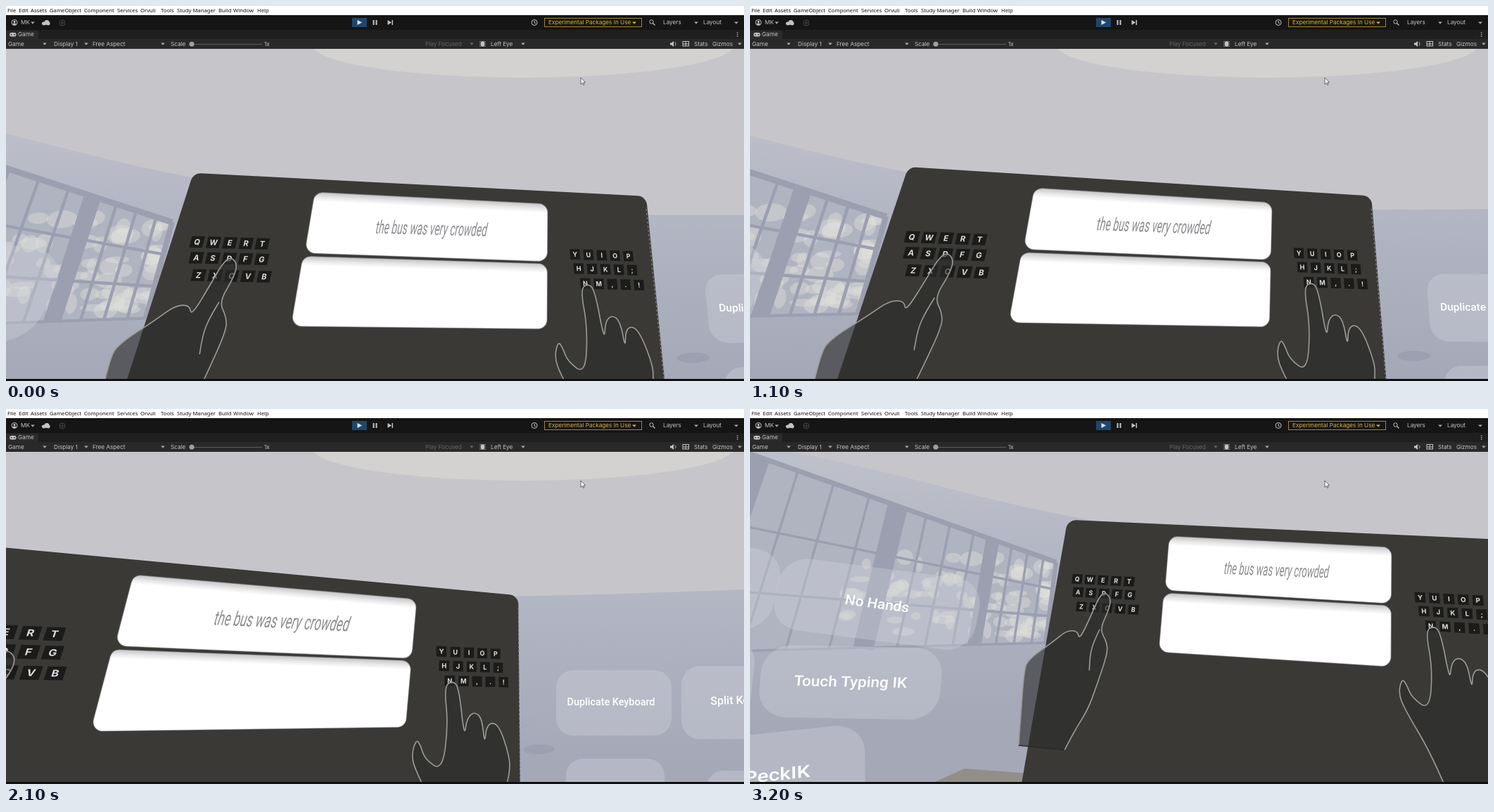
Animation of 1049x534 px, one loop 3300 ms. Source, as an HTML page with a canvas:

```html
<!DOCTYPE html>
<html lang="en">
<head>
<meta charset="utf-8">
<title>Keyboard study</title>
<style>
html, body { margin: 0; width: 100%; height: 100%; overflow: hidden; background: #101010; }
canvas { display: block; }
</style>
</head>
<body>
<canvas id="stage" width="1049" height="534"></canvas>
<script>
const ctx = document.getElementById('stage').getContext('2d');
const LOOP = 3300, STEP = 100;

// Camera path: time, then the corners of the white text area, clockwise.
// Everything else in the room is projected from it.
const VIEWS = [
  [0, 439,265, 770,282, 769,460, 405,456],
  [700, 432,261, 764,280, 762,455, 398,449],
  [1500, 350,256, 701,280, 694,459, 308,454],
  [2100, 181,236, 584,271, 568,453, 120,459],
  [2400, 491,188, 812,206, 810,372, 472,360],
  [2800, 677,126, 998,132, 998,303, 668,284],
  [3200, 596,181, 912,197, 911,367, 581,346]];
const TIMES = VIEWS.map(v => v[0]), AREAS = VIEWS.map(v => v.slice(1));
// Views in which the parts are laid out
const BOARD = 4, LEFT_MENU = 5, RIGHT_MENU = 3, WALL = 6;

// Monotone cubic through the values at TIMES
function curve(v, t) {
  const slope = k => (v[k + 1] - v[k]) / (TIMES[k + 1] - TIMES[k]);
  const last = TIMES.length - 1;
  const tangent = k => {
    if (k === 0 || k === last) return slope(Math.min(k, last - 1));
    const a = slope(k - 1), b = slope(k);
    return a * b <= 0 ? 0 : 2 * a * b / (a + b);
  };
  let i = 0;
  while (i < last - 1 && t >= TIMES[i + 1]) i++;
  const d = TIMES[i + 1] - TIMES[i], u = (t - TIMES[i]) / d, w = 1 - u;
  return w * w * ((1 + 2 * u) * v[i] + u * d * tangent(i)) +
         u * u * ((1 + 2 * w) * v[i + 1] - w * d * tangent(i + 1));
}

// Projection of the unit square onto a quad
function quad([x0, y0, x1, y1, x2, y2, x3, y3]) {
  const ax = x1 - x2, ay = y1 - y2, bx = x3 - x2, by = y3 - y2;
  const sx = x0 - x1 + x2 - x3, sy = y0 - y1 + y2 - y3, den = ax * by - bx * ay;
  const g = (sx * by - bx * sy) / den, h = (ax * sy - sx * ay) / den;
  return [x1 - x0 + g * x1, x3 - x0 + h * x3, x0, y1 - y0 + g * y1, y3 - y0 + h * y3, y0, g, h, 1];
}
const invert = ([a, b, c, d, e, f, g, h, i]) => [
  e * i - f * h, c * h - b * i, b * f - c * e,
  f * g - d * i, a * i - c * g, c * d - a * f,
  d * h - e * g, b * g - a * h, a * e - b * d];
const multiply = (m, n) => m.map((_, k) => {
  const r = k - k % 3, c = k % 3;
  return m[r] * n[c] + m[r + 1] * n[c + 3] + m[r + 2] * n[c + 6];
});
const area = t => AREAS[0].map((_, j) => curve(AREAS.map(a => a[j]), t));
const project = (view, t) => multiply(quad(area(t)), invert(quad(AREAS[view])));
function point(m, x, y) {
  const w = m[6] * x + m[7] * y + m[8];
  return [(m[0] * x + m[1] * y + m[2]) / w, (m[3] * x + m[4] * y + m[5]) / w];
}
// Draw in the local frame around (x, y)
function at(m, x, y, draw) {
  const [X, Y] = point(m, x, y), w = m[6] * x + m[7] * y + m[8];
  ctx.save();
  ctx.transform((m[0] - X * m[6]) / w, (m[3] - Y * m[6]) / w, (m[1] - X * m[7]) / w, (m[4] - Y * m[7]) / w, X, Y);
  draw();
  ctx.restore();
}
// Nearer things move further than the board
function nearer(view, t, kx, ky, draw) {
  const d = area(t)[0] - AREAS[view][0];
  ctx.save();
  ctx.translate(d * kx, d * ky);
  draw(project(view, t));
  ctx.restore();
}
const pairs = a => a.reduce((out, v, i) => (i % 2 ? out[out.length - 1].push(v) : out.push([v]), out), []);
const mix = (a, b, k) => a + (b - a) * k;
function seeded(seed) {
  return () => (seed = seed * 16807 % 2147483647) / 2147483647;
}

function fill(color) { ctx.fillStyle = color; ctx.fill(); }
function stroke(color, width = 1) { ctx.strokeStyle = color; ctx.lineWidth = width; ctx.stroke(); }
function rect(x, y, w, h, color) { ctx.fillStyle = color; ctx.fillRect(x, y, w, h); }
function disc(x, y, rx, ry, color) {
  ctx.beginPath(); ctx.ellipse(x, y, rx, ry, 0, 0, 7); fill(color);
}
function trace(pts) { ctx.beginPath(); pts.forEach(p => ctx.lineTo(...p)); }
function poly(pts, color) { trace(pts); ctx.closePath(); fill(color); }
function line(pts, color, width) { trace(pts); stroke(color, width); }
function roundPoly(pts, r) {
  const n = pts.length, [a, b] = [pts[n - 1], pts[0]];
  ctx.beginPath(); ctx.moveTo((a[0] + b[0]) / 2, (a[1] + b[1]) / 2);
  pts.forEach((p, i) => ctx.arcTo(...p, ...pts[(i + 1) % n], r));
  ctx.closePath();
}
function smooth(pts) {
  ctx.beginPath(); ctx.moveTo(...pts[0]);
  for (let i = 1; i < pts.length - 1; i++) {
    const [x, y] = pts[i], [u, v] = pts[i + 1];
    ctx.quadraticCurveTo(x, y, (x + u) / 2, (y + v) / 2);
  }
  ctx.lineTo(...pts[pts.length - 1]);
}
function text(s, x, y, font, color, align = 'left') {
  ctx.font = font; ctx.fillStyle = color; ctx.textAlign = align; ctx.textBaseline = 'middle';
  ctx.fillText(s, x, y);
}
function gradient(x0, y0, x1, y1, ...colors) {
  const g = ctx.createLinearGradient(x0, y0, x1, y1);
  colors.forEach((c, i) => g.addColorStop(i / (colors.length - 1), c));
  return g;
}

function room(t) {
  rect(0, 61, 1049, 470, '#c6c6ca');
  if (t < 2400) disc(735, 55, 300, 47, '#d3d2d1');
  const m = project(WALL, t), [x, y] = point(m, 435, 218);
  ctx.save();
  ctx.translate(x, y);
  smooth([[-800, -220], [-500, -180], [-285, -140], [-5, -66], [265, -28], [700, -4], [1400, -28]]);
  ctx.lineTo(1400, 700); ctx.lineTo(-800, 700);
  fill(gradient(0, -140, 0, 230, '#bdc0ca', '#afb2c0', '#a5a8b7'));
  poly([[-400, 420], [-270, 357], [-130, 294], [0, 304], [0, 460]], '#918f88');
  ctx.restore();
  at(m, 435, 218, windows);
}

// Receding window wall; the origin is its far top corner
function windows() {
  const top = x => x * .3545, sill = x => 115 - x * .035;
  const foot = x => x - (sill(x) - top(x)) * (.13 - x * .0005);
  const frame = '#9b9fb0', far = -980;
  ctx.save();
  trace([[far, top(far)], [0, 0], [foot(0), sill(0)], [foot(far), sill(far)]]);
  ctx.clip();
  rect(-1500, -400, 1500, 600, '#b0b4c1');
  const random = seeded(11);
  for (let i = 0; i < 90; i++) {
    const k = random(), x = -10 - 290 * k * k, y = mix(0, 112, random()) - 12 * k;
    disc(x, y, 5 + 12 * random(), 4 + 8 * random(), 'rgba(224,224,217,.4)');
  }
  ctx.restore();
  const bar = (x, w) => line([[x, top(x)], [foot(x), sill(x)]], frame, w);
  for (let x = 0, w = 90; x > far; x -= w, w *= 1.5) {
    bar(x, x ? w / 7 : 6);
    [.2, .45, .7].forEach(k => bar(x - w * k, 3.5));
  }
  for (let k = 0; k < 4; k++)
    line([far, 0].map(x => [mix(x, foot(x), k / 3), mix(top(x), sill(x), k / 3)]), frame, k ? 3.5 : 7);
}

function button(x, y, w, h, r) {
  ctx.beginPath(); ctx.roundRect(x, y, w, h, r); fill('rgba(208,211,220,.36)');
}
const medium = size => `500 ${size}px Roboto, sans-serif`;
function menus(t) {
  nearer(LEFT_MENU, t, .14, -.06, m => {
    // Labels widen towards the viewer on the left
    const item = (label, x, y, size, turn, w, h) => at(m, x, y, () => {
      ctx.rotate(turn);
      button(-w / 2, -h / 2, w, h, 34);
      ctx.scale(1 + (317 - x) / 900, 1);
      text(label, 0, 0, medium(size), '#fff', 'center');
    });
    item('Finger Tip', 53, 190, 21, .13, 285, 100);
    item('No Hands', 317, 221, 17.6, .12, 245, 92);
    item('HandTracking', 30, 317, 20, .01, 290, 108);
    item('Touch Typing IK', 292, 320, 18.2, .02, 213, 90);
    item('Hunt&PeckIK', 182, 436, 20.5, -.09, 262, 104);
  });
  nearer(RIGHT_MENU, t, .06, .01, m => at(m, 782, 372, () => {
    button(0, 0, 164, 93, 24);
    button(178, -6, 184, 104, 26);
    button(14, 126, 140, 90, 24);
    button(214, 143, 160, 90, 24);
    text('Duplicate Keyboard', 78, 46, medium(14.4), '#fff', 'center');
    ctx.rotate(-.03);
    text('Split Keyboard', 218, 51, medium(16), '#fff');
    disc(-28, 112, 22, 7, 'rgba(140,145,162,.4)');
  }));
}

function board(m) {
  const shape = a => pairs(a).map(p => point(m, ...p));
  const p = shape([330,162, 955,196, 982,600, 240,594]);
  poly([p[3], p[2], [p[2][0], 700], [p[3][0] - 8, 700]], '#707077');
  roundPoly(p, 14);
  fill('#3a3936');
  ctx.setLineDash([3, 3]);
  line([[p[1][0], p[1][1] + 18], p[2]], '#8f8f90');
  ctx.setLineDash([]);

  [[491,188, 812,206, 811,284, 483,268], [481,272, 811,287, 810,372, 472,360]].forEach(box => {
    const q = shape(box), [a, b] = q, len = Math.hypot(b[0] - a[0], b[1] - a[1]) / 13;
    roundPoly(q, 13);
    fill(gradient(...a, a[0] + (a[1] - b[1]) / len, a[1] + (b[0] - a[0]) / len, '#c4c4c7', '#e6e6e8', '#fff'));
    stroke('rgba(120,120,122,.5)', 1.2);
  });
  at(m, 650.5, 239, () => {
    ctx.transform(.555, .02, -.1, 1, 0, 0);
    text('the bus was very crowded', 0, 0, 'italic 24.5px Roboto, sans-serif', '#8b8b90', 'center');
  });
}

function keys(m, rows, w, h, size, lean, pitch) {
  rows.forEach(([letters, x, y]) => [...letters].forEach((c, i) => {
    at(m, x + pitch * i, y + .85 * i, () => {
      ctx.transform(1, .03, -lean, 1, 0, 0);
      rect(-w / 2, -h / 2, w, h, '#1b1b1a');
      text(c, 0, .5, `bold ${size}px Inter, sans-serif`, '#dedede', 'center');
    });
  }));
}

const LEFT_HAND = pairs([241,512, 247,450, 253,395, 260,377, 303,348, 325,331, 343,331, 346,345,
  368,302, 378,281, 388,271, 398,281, 394,299, 379,328, 390,347, 391,364, 372,415, 358,450, 335,485, 318,515]);
const CREASE = pairs([379,328, 370,345, 363,365, 361,391]);
const RIGHT_HAND = pairs([888,550, 866,495, 828,430, 820,408, 825,388, 831,396, 838,414, 862,431,
  866,372, 857,322, 867,314, 877,322, 889,390, 891,364, 901,356, 912,365, 918,400, 919,376,
  929,371, 940,382, 953,415, 957,435, 949,475, 952,550]);
function outline(m, pts, color) {
  smooth(pts.map(p => point(m, ...p)));
  if (color) fill(color);
  stroke('#9b9b97', 1.6);
}
function hands(m) {
  const skin = 'rgba(45,45,44,.62)';
  outline(m, LEFT_HAND, skin);
  outline(m, CREASE);
  line([LEFT_HAND[0], LEFT_HAND[LEFT_HAND.length - 1]].map(p => point(m, ...p)), '#2a2a2a', 1.5);
  outline(m, RIGHT_HAND, skin);
}

const UI = '8.2px Inter, sans-serif', PALE = '#c4c4c4', DIM = '#666', GOLD = '#dcb43c';
const caret = (x, y, c = '#aaa') => poly([[x - 2.8, y - 1.5], [x + 2.8, y - 1.5], [x, y + 1.8]], c);
function ring(x, y, r, c) { ctx.beginPath(); ctx.arc(x, y, r, 0, 7); stroke(c); }
function labels(y, font, color, items) {
  items.forEach(([s, x]) => text(s, x, y, font, color));
}
function editor() {
  rect(0, 0, 1049, 13, '#fff');
  rect(0, 13, 1049, 21, '#151515');
  rect(0, 34, 1049, 13, '#1f1f1f');
  rect(0, 35, 46, 12, '#2b2b2b');
  rect(0, 47, 1049, 14, '#292929');
  rect(0, 531, 1049, 3, '#111');
  labels(7, '7.7px "Noto Sans", sans-serif', '#111', [['File', 2], ['Edit', 18], ['Assets', 35],
    ['GameObject', 62], ['Component', 111], ['Services', 158], ['Orvuli', 191], ['Tools', 220],
    ['Study Manager', 243], ['Build', 302], ['Window', 323], ['Help', 357]]);

  ring(12, 23.5, 4, PALE);
  disc(12, 22.5, 1.5, 1.5, PALE); disc(12, 25.8, 2.5, 1.3, PALE);
  caret(38, 24);
  disc(54, 25, 3, 2.4, PALE); disc(58, 23.5, 3.5, 3.5, PALE); disc(60, 25, 2.6, 2.4, PALE);
  ring(80, 24, 4, '#484848'); ring(80, 24, 1.5, '#484848');
  rect(492, 17, 21, 13, '#1f466b');
  poly([[499.5, 20], [499.5, 27], [506, 23.5]], '#e4e4e4');
  rect(521.5, 20, 2, 7, PALE); rect(525.5, 20, 2, 7, PALE);
  poly([[542.5, 20], [542.5, 27], [548, 23.5]], PALE); rect(548.5, 20, 1.5, 7, PALE);
  ring(751, 23.5, 4, PALE); line([[751, 21], [751, 24], [753, 24.5]], PALE);
  ctx.strokeStyle = '#a3842b'; ctx.strokeRect(765.5, 17.5, 138, 12);
  text('Experimental Packages In Use', 771, 24, UI, GOLD); caret(893, 24, GOLD);
  ring(917.5, 22.5, 2.7, PALE); line([[919.5, 24.5], [922.5, 27.5]], PALE, 1.3);
  labels(24, UI, PALE, [['MK', 21], ['Layers', 934], ['Layout', 991]]);
  caret(981, 24); caret(1038, 24);

  ctx.beginPath(); ctx.roundRect(5, 38, 9.5, 5.5, 2.5); fill(PALE);
  disc(7.5, 40.7, 1, 1, '#333'); disc(12, 40.7, 1, 1, '#333');
  text('Game', 17, 41, UI, PALE);
  [37.5, 40, 42.5].forEach(y => rect(1039, y, 1.3, 1.3, PALE));

  labels(54.3, UI, PALE, [['Game', 3], ['Display 1', 68], ['Free Aspect', 123], ['Scale', 234], ['1x', 367],
    ['Left Eye', 689], ['Stats', 978], ['Gizmos', 1004]]);
  text('Play Focused', 596, 54.3, UI, DIM);
  [55, 114, 223, 735, 1043].forEach(x => caret(x, 54));
  caret(662, 54, DIM);
  line([[264, 54.5], [364, 54.5]], '#5c5c5c');
  disc(264, 54.3, 3.5, 3.5, '#a0a0a0');
  disc(677.5, 54, 2.6, 3.8, PALE);
  [-3, 0, 3].forEach(d => line([[673, 54 + d], [682, 54 + d]], PALE, .8));
  poly([[944, 52.5], [946, 52.5], [949, 50], [949, 58], [946, 55.5], [944, 55.5]], PALE);
  ctx.beginPath(); ctx.arc(949, 54, 3, -1, 1); stroke(PALE);
  ctx.strokeRect(962, 50.5, 8.5, 6.5);
  line([[962, 54], [970.5, 54]], PALE); line([[966.2, 50.5], [966.2, 57]], PALE);

  poly([[817, 102], [817, 111.5], [819.2, 109.5], [820.8, 112.5], [822, 111.8], [820.7, 109], [823.5, 108.8]], '#fff');
  stroke('#444', .8);
}

function draw(t) {
  room(t);
  menus(t);
  const m = project(BOARD, t);
  board(m);
  keys(m, [['QWERT', 344, 252], ['ASDFG', 345, 272], ['ZXCVB', 350, 294]], 16.5, 14.5, 9.8, .14, 20.8);
  keys(m, [['YUIOP', 850, 275], ['HJKL;', 855, 294], ['NM,.!', 864, 314]], 14, 14, 9, -.06, 19);
  hands(m);
  editor();
}

const start = performance.now();
function tick() {
  const t = (performance.now() - start) % LOOP;
  draw(Math.floor(t / STEP) * STEP);
  requestAnimationFrame(tick);
}
tick();
</script>
</body>
</html>
```
